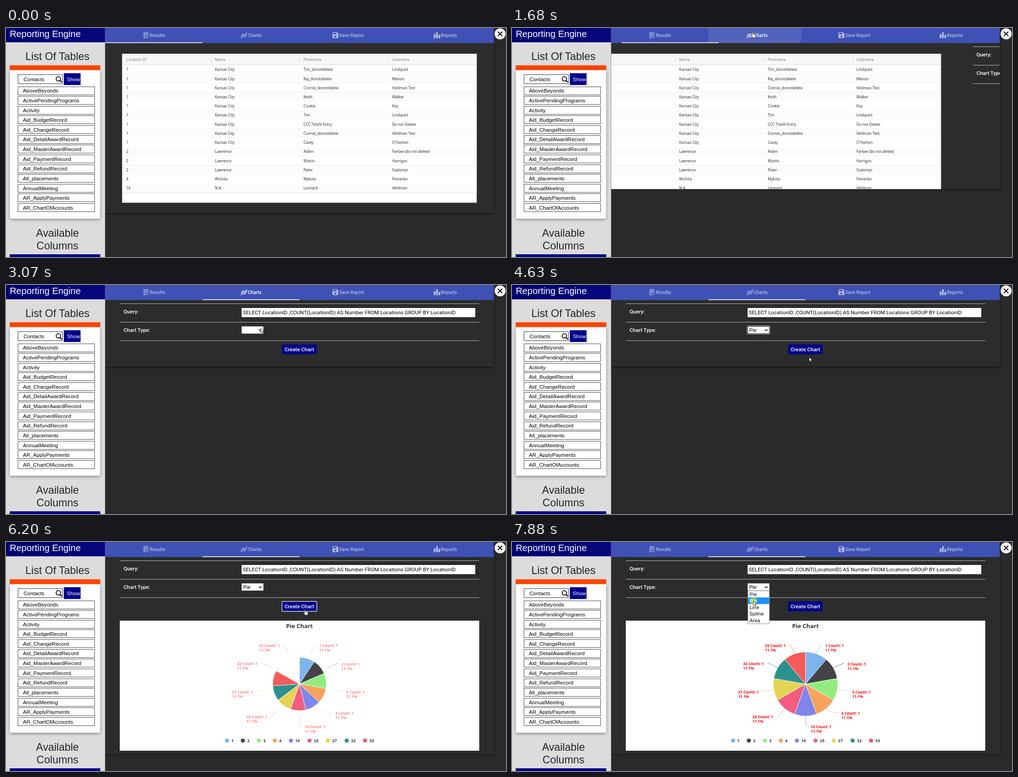
Animation of 1103x508 px, one loop 8 s. Source, as an HTML page:

```html
<!DOCTYPE html>
<html lang="en">
<head>
<meta charset="utf-8">
<title>Reporting Engine</title>
<style>
  html, body { margin: 0; width: 100%; height: 100%; overflow: hidden; background: #2b2b2b; }
  svg { display: block; width: 1103px; height: 508px; }
  text { white-space: pre; }
  .arial { font-family: "Liberation Sans", Arial, sans-serif; font-size: 11.6px; }
  .rob { font-family: Roboto, sans-serif; font-size: 11.55px; }
  .med { font-weight: 500; fill: #fff; }
  .grid { font-family: "Open Sans", sans-serif; font-size: 8.2px; fill: #222; }
  .chart { font-family: "Open Sans", sans-serif; font-size: 8.3px; font-weight: 700; }
  .mid { text-anchor: middle; }
  .line { fill: none; }
</style>
</head>
<body>
<svg id="stage" viewBox="0 0 1103 508"></svg>
<script>
const LOOP = 8000, SLIDE = 857.25, TAB = 214.25;
const $ = id => document.getElementById(id);
const rect = (x, y, w, h, fill, more = '') =>
  `<rect x="${x}" y="${y}" width="${w}" height="${h}" fill="${fill}" ${more}/>`;
const text = (x, y, s, cls, more = '') => `<text x="${x}" y="${y}" class="${cls}" ${more}>${s}</text>`;
const path = (d, more) => `<path d="${d}" ${more}/>`;
const size = n => `style="font-size:${n}px"`;

// ---- sidebar
const tables = ['AboveBeyonds', 'ActivePendingPrograms', 'Activity', 'Aid_BudgetRecord', 'Aid_ChangeRecord',
  'Aid_DetailAwardRecord', 'Aid_MasterAwardRecord', 'Aid_PaymentRecord', 'Aid_RefundRecord',
  'All_placements', 'AnnualMeeting', 'AR_ApplyPayments', 'AR_ChartOfAccounts'];

const sidebar = () => rect(0, 0, 218.6, 508, '#dcdcdc')
  + rect(0, 0, 218.6, 31.7, 'url(#navy)')
  + text(8.2, 20, 'Reporting Engine', 'arial', 'fill="#fff" ' + size(20.3))
  + text(113.5, 71, 'List Of Tables', 'arial mid', 'fill="#212529" ' + size(23.4))
  + rect(8.5, 94, 199, 329, '#fff', 'rx="3" style="filter:drop-shadow(0 2px 3px #0006)"')
  + rect(8, 82.7, 200, 10.5, '#ff4500')
  + rect(26.5, 103.5, 98, 20, '#fff', 'stroke="#333"')
  + text(38.7, 118, 'Contacts', 'arial')
  + '<circle cx="115.5" cy="112.8" r="4.9" class="line" stroke="#000" stroke-width="1.8"/>'
  + path('M119.2 116.5l4 4', 'stroke="#000" stroke-width="2.4"')
  + rect(127.5, 100.3, 37, 26.2, '#00008b')
  + text(134.3, 118, 'Show', 'arial', 'fill="#fff"')
  + tables.map((s, i) => {
      const y = 139 + i * 21.63;
      return rect(26.5, Math.round(y - 9.5) + .5, 169, 18, '#fff', 'stroke="#444"') + text(37.3, y + 4.3, s, 'arial');
    }).join('')
  + ['Available', 'Columns'].map((s, i) =>
      text(113.5, 463 + i * 28, s, 'arial mid', 'fill="#212529" ' + size(23.4))).join('')
  + rect(8, 502, 200, 6, '#00008b');

// ---- top tabs: label, icon x, icon
const tabs = [
  ['Results', 300, 'M4 7h16v2H4V7zm0 6h16v-2H4v2zm0 4h7v-2H4v2zm0 4h7v-2H4v2zm11.4-2.8L14 16.75l-1.4 1.4L15.4 21 20 16.4 18.6 15l-3.2 3.2zM4 3v2h16V3H4z'],
  ['Charts', 516.3, 'M2 20l7.5-7.5 4 4 7.1-8L22 9.9l-8.5 9.6-4-4-6 6L2 20zm1.5-4.5l6-6 4 4L22 3.9l-1.4-1.4-7.1 8-4-4L2 14l1.5 1.5z'],
  ['Save Report', 718, 'M17 3H5c-1.1 0-2 .9-2 2v14c0 1.1.9 2 2 2h14c1.1 0 2-.9 2-2V7l-4-4zm-5 16c-1.7 0-3-1.3-3-3s1.3-3 3-3 3 1.3 3 3-1.3 3-3 3zm3-10H5V5h10v4z'],
  ['Reports', 942, 'M7.5 21H2V9h5.5v12zm7.25-18h-5.5v18h5.5V3zM22 11h-5.5v10H22V11z']];

const nav = () => rect(218.6, 0, 857.6, 33.3, '#3f51b5')
  + '<circle id="ripple" cx="531" cy="9" fill="#fff" clip-path="url(#tabClip)"/>'
  + tabs.map(([s, x, d], i) => `<g id="tab${i}" opacity=".6">`
      + path(d, `fill="#fff" transform="translate(${x} 7.4) scale(.722)"`)
      + text(x + 17.2, 19.6, s, 'rob med', size(10.15)) + '</g>').join('')
  + rect(219, 31.8, TAB, 1.6, '#fff', 'id="ink"');

// ---- results grid
const people = `Tim_donotdelete,Lindquist;Raj_donotdelete,Menon;Connie_donotdelete,Veldman Test;Keith,Walker;Cookie,Kay;
Tim,Lindquist;CCC TitleIV Entry,Do not Delete;Connie_donotdelete,Veldman Test;Casey,O'Hanlon;
Alden,Farlow (do not delete);Martin,Harrigan;Peter,Szalontai;Mykola,Petrenko;Leonard,Veldman`
  .split(';').map(s => s.trim().split(','));
const place = i => i < 9 ? [1, 'Kansas City'] : i < 12 ? [2, 'Lawrence'] : i < 13 ? [4, 'Wichita'] : [10, 'N.A.'];
const cells = (row, y, more) => row.map((s, i) => text(265.3 + i * 195.5, y, s, 'grid', more)).join('');

const grid = () => rect(256.3, 57, 782, 330.5, '#fff')
  + rect(256.3, 57, 782, 24.5, '#f7f7f7')
  + cells(['Location ID', 'Name', 'Firstname', 'Lastname'], 72.6, 'style="font-size:8.5px;fill:#777"')
  + [452.5, 647.5, 843.5].map(x => rect(x - .5, 65, 1, 10, '#d8d8d8')).join('')
  + rect(256.3, 81, 782, 1, '#dadada')
  + people.map((p, i) => {
      const y = 82 + i * 20.23;
      return rect(256.3, y, 782, 20.23, i % 2 ? '#fafcfe' : '#fff')
        + rect(256.3, Math.round(y + 20), 782, 1, '#dfe2e6') + cells([...place(i), ...p], y + 13.3);
    }).join('')
  + rect(256.8, 57.5, 781, 329.5, 'none', 'stroke="#ddd"');

// ---- chart form
const sql = 'SELECT LocationID ,COUNT(LocationID) AS Number FROM Locations GROUP BY LocationID';
const form = () => [41, 82, 123].map(y => rect(251, y, 793, 1, '#bdbdbd')).join('')
  + text(259.2, 63.2, 'Query:', 'rob med') + text(259.2, 104.2, 'Chart Type:', 'rob med')
  + rect(519.8, 51, 515.4, 20.3, '#fff') + text(522.3, 65, sql, 'rob')
  + rect(519.8, 91.8, 48, 16, '#fff')
  + path('M557.8 98.6l3 3 3-3', 'class="line" stroke="#111" stroke-width="1.5"')
  + text(523.2, 104, 'Pie', 'rob', 'id="value"')
  + `<g id="focus">${rect(518.9, 90.9, 49.8, 17.8, 'none', 'stroke="#fff" rx="1"')}${rect(520, 92, 47.6, 15.6, 'none', 'stroke="#111"')}</g>`
  + rect(609, 132, 76, 21.5, '#00008b')
  + rect(608.6, 131.8, 77, 22, 'none', 'id="press" stroke="#fff" stroke-width="1.2" rx="2"')
  + text(647, 147, 'Create Chart', 'rob med mid');

// ---- pie chart: name, label x, first baseline, colour
const CX = 647.5, CY = 315, R = 71;
const slices = [
  [1, 691, 232.5, '#7cb5ec'], [2, 739.7, 273.5, '#434348'], [3, 750.5, 335.5, '#90ed7d'],
  [4, 726.5, 383, '#f7a35c'], [10, 659, 412.8, '#8085e9'], [25, 530.5, 391, '#f15c80'],
  [27, 498.8, 335.5, '#e4d354'], [32, 509.7, 272.5, '#2b908f'], [33, 558, 232.5, '#f45b5b']];
const STEP = Math.PI * 2 / slices.length;
const polar = (a, r) => [CX + r * Math.sin(a), CY - r * Math.cos(a)];

function connector(i, x, y) {
  const a = (i + .5) * STEP, [ex, ey] = polar(a, R), [bx, by] = polar(a, R + 4.5), right = i < 5;
  const lx = right ? x - 7 : x + 54, ly = y - 4;
  return `M${lx} ${ly}C${lx + (right ? -4 : 4)} ${ly} ${2 * bx - ex} ${2 * by - ey} ${bx} ${by}L${ex} ${ey}`;
}

const legendX = [487.5, 522.5, 558, 593, 628.5, 669.5, 710, 751.5, 792];
const chart = () => rect(251, 174.5, 793, 288.5, '#fff')
  + text(CX, 191.3, 'Pie Chart', 'chart mid', 'fill="#333" ' + size(12.9))
  + slices.map(([n, , , c], i) => `<circle cx="${legendX[i]}" cy="440.5" r="4.5" fill="${c}"/>`
      + text(legendX[i] + 9.6, 443.8, n, 'chart', 'fill="#333" ' + size(9))).join('')
  + slices.map((s, i) => path('', `id="slice${i}" fill="${s[3]}" stroke="#fff" stroke-width=".8"`)).join('')
  + '<g id="labels">' + slices.map(([n, x, y, c], i) =>
      path(connector(i, x, y), `class="line" stroke="${c}" stroke-width=".8"`)
      + text(x, y, n + ' Count: 1', 'chart', 'fill="#f00"')
      + text(x, y + 10.2, '11.1%', 'chart', 'fill="#f00"')).join('') + '</g>';

function drawPie(p) {
  slices.forEach((s, i) => {
    const a = i * STEP * p, b = (i + 1) * STEP * p;
    $('slice' + i).setAttribute('d', p > 0
      ? `M${CX} ${CY}L${polar(a, R * p)}A${R * p} ${R * p} 0 0 1 ${polar(b, R * p)}Z` : '');
  });
}

// ---- drop-down list
const kinds = ['Pie', 'Bar', 'Line', 'Spline', 'Area'];
const menu = () => rect(520.3, 108.3, 47.6, 73, '#fff', 'stroke="#888"')
  + rect(520.8, 0, 46.6, 14.6, '#1e90ff', 'id="mark"')
  + kinds.map((s, i) => text(523.8, 119.5 + i * 14.55, s, 'rob', `id="kind${i}"`)).join('');

const arrow = 'M0 0V9.6l2.2-2 1.5 3.3 1.6-.7-1.5-3.2h3z';
const hand = 'M-1.1.6Q0-1 1.1.6V4.4l4 .8q1.5.4 1.2 2L5.4 12.5H.2L-3.6 7.4q-.3-1.6 1.2-1.1l1.3 1.1z';

$('stage').innerHTML = `<defs>
  <linearGradient id="navy"><stop stop-color="#00006e"/><stop offset="1" stop-color="#08087e"/></linearGradient>
  <clipPath id="tabClip">${rect(433.25, 0, TAB, 33.3, '#000')}</clipPath>
  <clipPath id="bodyClip">${rect(219, 33, 857, 0, '#000', 'id="body"')}</clipPath></defs>`
  + rect(0, 0, 1103, 508, '#2a2a2a')
  + rect(219, 0, 857, 0, '#2c2c2c', 'id="panel" style="filter:drop-shadow(0 1.5px 2px #0009)"')
  + `<g clip-path="url(#bodyClip)"><g id="grid">${grid()}</g><g id="form">${form()}<g id="chart">${chart()}</g></g></g>`
  + nav() + sidebar()
  + '<circle cx="1090" cy="13" r="12.2" fill="#f2f2f2"/>'
  + path('M1085.2 8.2l9.6 9.6m0-9.6l-9.6 9.6', 'stroke="#111" stroke-width="2"')
  + `<g id="menu">${menu()}</g>`
  + `<g id="cursor"><circle id="click" r="7.5" fill="#ff0" opacity=".5"/>`
  + path('', 'id="pointer" fill="#fff" stroke="#111" stroke-width=".8"') + '</g>';

// ---- timing
const clamp = v => Math.max(0, Math.min(1, v));
const ramp = (t, a, b) => clamp((t - a) / (b - a));
const within = (t, ...spans) => spans.some(([a, b]) => t >= a && t < b);
const show = (id, on) => $(id).setAttribute('display', on ? 'inline' : 'none');
const set = (id, name, v) => $(id).setAttribute(name, v);

// cubic-bezier(x1, 0, x2, 1)
function bezier(x1, x2, x) {
  let lo = 0, hi = 1;
  for (let i = 0; i < 24; i++) {
    const s = (lo + hi) / 2, q = 1 - s;
    if (3 * x1 * s * q * q + 3 * x2 * s * s * q + s ** 3 < x) lo = s; else hi = s;
  }
  return lo * lo * (3 - 2 * lo);
}
const glide = (t, start, end) => bezier(.35, .25, ramp(t, start, end));

// pointer stops: time, x, y
const stops = [[140, 268, 360], [330, 620, 428], [560, 962, 300], [900, 531, 9], [2140, 531, 9], [2500, 545, 142],
  [2910, 562, 96], [3220, 562, 96], [3600, 548, 121], [4320, 548, 121], [4520, 650, 174], [4630, 655.5, 160],
  [4780, 657, 154], [4900, 657, 154], [5020, 660, 150], [6510, 660, 150], [6720, 655, 172], [7100, 562, 97],
  [7200, 562, 100], [7340, 562, 100], [7800, 533, 131]];

function pointerAt(t) {
  const i = stops.findIndex(s => s[0] > t);
  if (i < 0) return stops[stops.length - 1].slice(1);
  if (!i) return stops[0].slice(1);
  const [t0, x0, y0] = stops[i - 1], [t1, x1, y1] = stops[i], k = ramp(t, t0, t1), e = k * k * (3 - 2 * k);
  return [x0 + (x1 - x0) * e, y0 + (y1 - y0) * e];
}

function draw(t) {
  const p = glide(t, 1598, 2090);
  const bottom = t >= 5430 ? 470 : 411 - 230 * glide(t, 1551, 2100);
  set('panel', 'height', bottom);
  set('body', 'height', bottom - 33);
  set('grid', 'transform', `translate(${-SLIDE * p})`);
  set('form', 'transform', `translate(${SLIDE * (1 - p)})`);
  set('ink', 'x', 219 + TAB * p);
  set('ripple', 'r', 120 * bezier(0, .2, ramp(t, 1412, 1862)));
  set('ripple', 'opacity', .1 * (1 - ramp(t, 1900, 2090)));
  set('tab1', 'opacity', .6 + .4 * (ramp(t, 1290, 1420) - ramp(t, 3070, 3140)));

  show('value', t >= 4220);
  show('focus', within(t, [4220, 5225]));
  show('press', within(t, [5225, 7180]));

  show('chart', t >= 5430);
  const grow = t < 5730 ? 0 : (1 - Math.cos(Math.PI * ramp(t, 5470, 6470))) / 2;
  drawPie(grow);
  set('labels', 'opacity', grow ** 4);

  const [x, y] = pointerAt(t), row = Math.floor((y - 108) / 14.55);
  show('menu', within(t, [3140, 4220], [7260, LOOP]));
  const picked = row < 0 && t > 7000 ? 0 : row;
  show('mark', picked >= 0);
  set('mark', 'y', 108.5 + picked * 14.55);
  kinds.forEach((_, i) => set('kind' + i, 'fill', i === picked ? '#fff' : '#111'));

  show('cursor', t >= 140);
  set('cursor', 'transform', `translate(${x} ${y})`);
  set('pointer', 'd', within(t, [960, 2200], [4960, 6600]) ? hand : arrow);
  show('click', within(t, [3140, 3290], [4150, 4220], [7260, 7400], [7800, LOOP]));
}

function tick() {
  draw(performance.now() % LOOP);
  requestAnimationFrame(tick);
}
tick();
</script>
</body>
</html>
```
